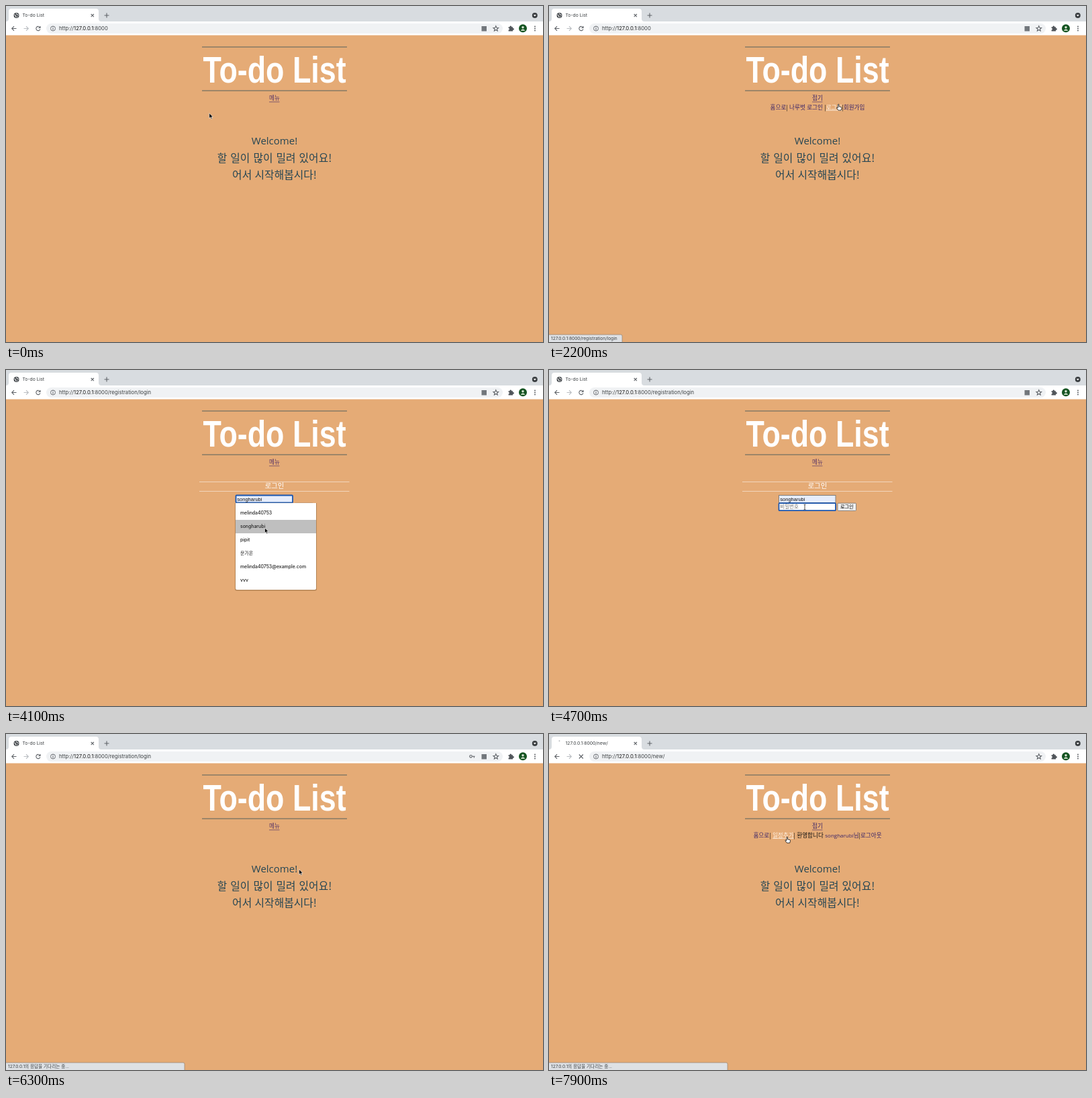
These frames come from a looping animation (800 px wide and 500 px high, 8000 ms). An HTML page:

```html
<!DOCTYPE html>
<html lang="ko">
<head>
<meta charset="utf-8">
<title>To-do List</title>
<style>
html, body { margin: 0; width: 100%; height: 100%; overflow: hidden; background: #e5ab76; }
svg { display: block; width: 800px; height: 500px; cursor: default; }
text { white-space: pre; }
.ui { font-family: Inter, 'Noto Sans CJK KR', sans-serif; fill: #3c4043; }
.page { font-family: 'Noto Sans CJK KR', 'Noto Sans CJK', sans-serif; text-anchor: middle; }
.nav { font-size: 8.6px; fill: #111; }
.link { fill: #3a2468; }
.seen { fill: #593667; font-weight: 500; }
.link.hot { fill: #fff3e6; text-decoration: underline; }
.field { font: 7.5px 'Liberation Sans', Arial, 'Noto Sans CJK KR', sans-serif; }
.icon { fill: none; stroke: #5f6368; stroke-width: 1.1; }
.latin { font-family: 'Open Sans', sans-serif; }
</style>
</head>
<body>
<svg viewBox="0 0 800 500">
  <rect width="800" height="500" fill="#e5ab76"/>

  <!-- browser window -->
  <rect width="800" height="24" fill="#d8dce0"/>
  <path d="M0 23Q4 23 4 19V8Q4 4 8 4H134Q138 4 138 8V19Q138 23 142 23H800V43.5H0Z" fill="#fff"/>
  <rect x="60" y="26" width="680" height="15" rx="7.5" fill="#f0f2f4"/>
  <g id="globe">
    <circle cx="15.5" cy="14" r="4" fill="#4a4e52"/>
    <path d="M12.3 13L14.5 14.2V16.6M15.2 10.8L16.2 12.5 18.6 13.6M17 15.5L16 17" fill="none" stroke="#fff" stroke-width="1"/>
  </g>
  <path id="spin" d="M-.8 -3.8H.8" stroke="#80868b"/>
  <text id="tab" class="ui" x="24.5" y="16.4" font-size="6.8"></text>
  <path class="icon" stroke="#333" d="M126.7 12L130.9 16.2M130.9 12L126.7 16.2M146.5 14H153.5M150 10.5V17.5"/>
  <circle cx="787.8" cy="14" r="4" fill="#3c4043"/>
  <path d="M785.8 13L787.8 15.5 789.8 13Z" fill="#fff"/>
  <path class="icon" d="M15.5 33.5H8.8M12 30.2L8.7 33.5 12 36.8"/>
  <path class="icon" style="stroke:#b9bdc1" d="M26.5 33.5H33.2M30 30.2L33.3 33.5 30 36.8"/>
  <path id="reload" class="icon" d="M50.5 31.8A3.1 3.1 0 1 0 50.9 34.4M51 30V32.5H48.4"/>
  <path id="stop" class="icon" d="M44.8 30.5L50.8 36.5M50.8 30.5L44.8 36.5"/>
  <g class="icon" stroke-width=".9">
    <circle cx="70" cy="33.5" r="3.5" stroke-width=".9"/>
    <path d="M70 33V35.5M70 31.3V32.2"/>
    <path d="M729.8 29.6L730.9 32.2 733.7 32.4 731.6 34.3 732.2 37 729.8 35.5 727.4 37 728 34.3 725.9 32.4 728.7 32.2Z"/>
  </g>
  <text class="ui" x="79" y="36.3" font-size="7.7">http://<tspan fill="#111">127.0.0.1</tspan><tspan id="path"></tspan></text>
  <g id="key" class="icon"><circle cx="692.5" cy="33.3" r="1.8"/><path d="M694.5 33.3H698.5M697.3 33.3V35.4"/></g>
  <rect id="badge" x="708.5" y="30" width="7.5" height="7.5" fill="#72777c"/>
  <path d="M748.6 31.2H750.6A1.3 1.3 0 1 1 753 31.2H755V33.2A1.3 1.3 0 1 1 755 35.6V37.6H748.6V35.6A1.3 1.3 0 0 0 748.6 33Z" fill="#50555a"/>
  <circle cx="770" cy="33.3" r="6" fill="#155422"/>
  <circle cx="770" cy="31.8" r="1.7" fill="#dce8d6"/>
  <path d="M766.5 36.8Q770 32.2 773.5 36.8Z" fill="#dce8d6"/>
  <g fill="#50555a"><circle cx="788" cy="30.5" r=".9"/><circle cx="788" cy="33.5" r=".9"/><circle cx="788" cy="36.5" r=".9"/></g>

  <!-- heading and menu -->
  <path d="M292 61H508M292 126H508" stroke="#264653" stroke-opacity=".75"/>
  <text transform="translate(400 114) scale(.8 1)" text-anchor="middle" fill="#fff" style="font:bold 56px 'Liberation Sans',Arial,sans-serif">To-do List</text>
  <g class="page nav">
    <text id="menu" x="400" y="140"></text>
    <path id="rule" d="M392 142.8H407.5" stroke="#593667" stroke-width=".7"/>
    <text id="guest" x="400" y="153.8"><tspan class="link">홈으로</tspan>| <tspan class="link">나루벗 로그인</tspan> |<tspan class="link" id="signin">로그인</tspan>|<tspan class="link">회원가입</tspan></text>
    <text id="member" x="400" y="153.8"><tspan class="link">홈으로</tspan>| <tspan class="link" id="add">일정추가</tspan>| <tspan font-weight="500">환영합니다</tspan> <tspan class="link"><tspan class="latin" font-size="8">songharubi</tspan>님</tspan>|<tspan class="link">로그아웃</tspan></text>
  </g>

  <g id="home" class="page" fill="#264653" font-size="15.8">
    <text class="latin" x="400" y="206" font-size="15">Welcome!</text>
    <text x="400" y="231.7" word-spacing=".6">할 일이 많이 밀려 있어요!</text>
    <text x="400" y="257">어서 시작해봅시다!</text>
  </g>

  <g id="login">
    <path d="M288 166.5H511.5M288 180.5H511.5" stroke="#fff" stroke-opacity=".5"/>
    <text class="page" x="400" y="176.3" font-size="10.3" fill="#fff">로그인</text>
    <rect id="idBox" x="342.5" y="186.5" width="84.5" height="11"/>
    <rect id="pwBox" x="342.5" y="198.2" width="84.5" height="11"/>
    <text id="idText" class="field" x="344.3" y="194.6"></text>
    <text id="pwText" class="field" x="344.3" y="206.3"></text>
    <rect x="430" y="198.2" width="27.5" height="11.2" rx="1" fill="#f0f0f0" stroke="#707070" stroke-width=".8"/>
    <text class="page" x="443.8" y="206.4" font-size="7.2" font-weight="500">로그인</text>
  </g>

  <g id="list" class="ui" font-size="6.9" font-weight="500">
    <path d="M341 198H463V326Q463 328.5 460 328.5H344Q341 328.5 341 326Z" fill="#5a3c1c" fill-opacity=".35"/>
    <path d="M342 198H462V325Q462 327 460 327H344Q342 327 342 325Z" fill="#fff"/>
    <rect id="pick" x="342" width="120" height="20" fill="#bfbfbf"/>
  </g>

  <g id="status">
    <path id="bubble" fill="#dee1e5" stroke="#9c8a78" stroke-width=".8"/>
    <text id="note" class="ui" x="3" y="496.7" font-size="6.6"></text>
  </g>

  <g id="cursor">
    <path id="arrow" d="M0 0V7.6L1.8 6 3 8.7 4.3 8.1 3.1 5.5H5.5Z" fill="#000" stroke="#fff" stroke-width=".6"/>
    <path id="hand" d="M-1 .5C-1 -.7 .5 -.7 .5 .5V3.2L3.8 3.9Q4.7 4.2 4.5 5.4L3.7 8.6H-.6L-3 5.3Q-3 4 -1.9 4.4L-1 5.2Z" fill="#fff" stroke="#111" stroke-width=".8"/>
    <path id="beam" d="M-1.5 -4Q0 -4 0 -3V3Q0 4 1.5 4M1.5 -4Q0 -4 0 -3M0 3Q0 4 -1.5 4" fill="none" stroke="#222" stroke-width=".8"/>
  </g>
</svg>
<script>
const $ = id => document.getElementById(id);
const show = (id, on) => { $(id).style.display = on ? '' : 'none'; };
const write = (id, text) => { if ($(id).textContent !== text) $(id).textContent = text; };
const set = (id, attrs) => { for (const k in attrs) $(id).setAttribute(k, attrs[k]); };

const names = ['melinda40753', 'songharubi', 'pipit', '문가온', 'melinda40753@example.com', 'vvv'];
names.forEach((name, i) => {
  const item = document.createElementNS('http://www.w3.org/2000/svg', 'text');
  item.textContent = name;
  item.setAttribute('x', 349);
  item.setAttribute('y', 215.4 + 20 * i);
  item.setAttribute('fill', '#222');
  $('list').append(item);
});

// time, x, y of the pointer
const track = [
  [0, 302.8, 159.5], [900, 397, 143], [1100, 401, 137], [1400, 401, 137],
  [1900, 428, 146.5], [2200, 431.5, 146.5], [2650, 431.5, 146.5], [3100, 391, 186.5],
  [3400, 386, 192], [3700, 385, 194], [3900, 385, 215], [4100, 385.5, 235],
  [4400, 385.5, 235], [4700, 381, 204], [5200, 381, 204], [5600, 437.5, 203],
  [6250, 437.5, 203], [6800, 401.5, 138], [7050, 401.5, 138], [7350, 358, 150],
  [7600, 355, 153.5], [8000, 355, 153.5]
];

function pointer(t) {
  const i = track.findIndex(k => k[0] > t);
  const [t0, x0, y0] = track[i - 1], [t1, x1, y1] = track[i];
  const u = (t - t0) / (t1 - t0), e = u * u * (3 - 2 * u);
  return [x0 + (x1 - x0) * e, y0 + (y1 - y0) * e];
}

function box(id, focus, fill) {
  set(id, { fill, stroke: focus ? '#1a56b0' : '#767676', 'stroke-width': focus ? 1.8 : 0.9, rx: focus ? 1 : 0 });
}

function draw(t) {
  const within = (a, b) => t >= a && t < b;
  const [x, y] = pointer(t);
  const onLogin = within(2600, 6100);
  const open = within(1300, 2600) || t >= 7100;
  const loading = within(2400, 2600) || within(5900, 6100) || t >= 7700;

  // address bar and tab
  const path = t < 2400 ? ':8000' : t < 7700 ? ':8000/registration/login' : ':8000/new/';
  write('path', path);
  write('tab', !loading ? 'To-do List' : t >= 7700 ? '127.0.0.1' + path : '127.0.0.1:8000/registration');
  show('globe', !loading);
  show('spin', loading);
  set('spin', { transform: `translate(15.5 14) rotate(${(7900 - t) * 0.36})` });
  show('reload', !loading);
  show('stop', loading);
  show('badge', !loading);
  show('key', within(5000, 7700));

  // menu
  const menuHot = within(1000, 1500) || within(6700, 7150);
  write('menu', open ? '접기' : '메뉴');
  set('menu', { class: 'link' + (open ? '' : ' seen') + (menuHot ? ' hot' : '') });
  show('rule', !menuHot);
  show('guest', open && t < 2600);
  show('member', open && t >= 7100);
  const signHot = within(1800, 2600), addHot = t >= 7200;
  set('signin', { class: signHot ? 'link hot' : 'link' });
  set('add', { class: addHot ? 'link hot' : 'link' });

  // form
  show('home', !onLogin);
  show('login', onLogin);
  const row = Math.floor((y - 203) / 20);
  const listed = within(3700, 4400);
  const value = t >= 4400 ? names[1] : listed && row >= 0 ? names[row] : '';
  const dots = [4800, 4950, 5100].filter(k => t >= k).length;
  box('idBox', within(3500, 4600), value ? '#e6edfc' : '#fff');
  box('pwBox', within(4600, 5600), '#fff');
  write('idText', value || '아이디');
  write('pwText', '•'.repeat(dots) || '비밀번호');
  set('idText', { fill: value ? '#111' : '#757575' });
  set('pwText', { fill: dots ? '#111' : '#757575' });
  show('list', listed);
  show('pick', row >= 0);
  if (listed) set('pick', { y: 203 + 20 * row });

  // status bubble
  const waiting = within(2400, 2800) || within(5900, 6400) || t >= 7700;
  show('status', waiting || signHot || addHot);
  write('note', waiting ? '127.0.0.1의 응답을 기다리는 중...' : '127.0.0.1:8000/' + (addHot ? 'new' : 'registration/login'));
  const w = waiting ? 266 : 109;
  set('bubble', { d: `M-1 489H${w - 2}Q${w} 489 ${w} 491V501H-1Z` });

  // pointer
  const hand = menuHot || within(1500, 2650) || t >= 7150;
  const beam = within(3250, 3720) || within(4650, 5350);
  set('cursor', { transform: `translate(${x} ${y})` });
  show('hand', hand);
  show('beam', beam);
  show('arrow', !hand && !beam);
}

const start = performance.now();
function tick() {
  draw((performance.now() - start) % 8000);
  requestAnimationFrame(tick);
}
tick();
</script>
</body>
</html>
```
